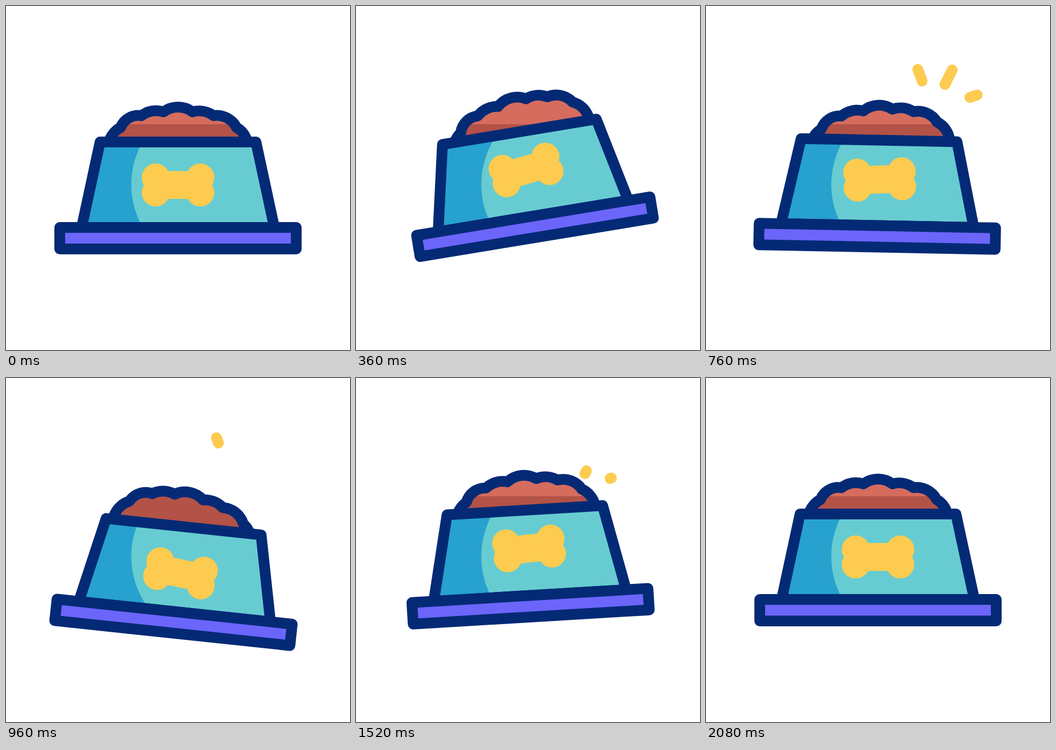
Animation, 640 px wide and 640 px high, one loop 2.4 s. Source, as an HTML page:

```html
<!DOCTYPE html>
<html lang="en">
<head>
<meta charset="utf-8">
<title>Pet bowl</title>
<style>
  @property --lift { syntax: "<length>"; inherits: true; initial-value: 0px; }
  @property --tilt { syntax: "<angle>"; inherits: true; initial-value: 0deg; }
  @property --stir { syntax: "<angle>"; inherits: true; initial-value: 0deg; }
  @property --spin { syntax: "<angle>"; inherits: true; initial-value: 0deg; }
  @property --boneX { syntax: "<length>"; inherits: true; initial-value: 0px; }
  @property --boneY { syntax: "<length>"; inherits: true; initial-value: 0px; }

  html, body { margin: 0; height: 100%; overflow: hidden; background: #fff; }

  svg {
    display: block; width: 100%; height: 100%;
    animation: 2.4s cubic-bezier(.37, 0, .63, 1) infinite;
    animation-name: lift, tilt, stir, spin, boneX, boneY;
  }

  .line { stroke: #042a75; stroke-width: 20; stroke-linejoin: round; stroke-linecap: round; }

  /* the bowl swings about (320, 352); food and bone lag behind it */
  .bowl {
    transform: translate(320px, calc(352px + var(--lift))) rotate(var(--tilt)) translate(-320px, -352px);
  }
  .food {
    transform: translate(320px, calc(352px + var(--lift))) rotate(var(--tilt))
      translate(0, -112px) rotate(var(--stir)) translate(-320px, -240px);
  }
  .bone {
    transform: translate(calc(320px + var(--boneX)), calc(333px + var(--boneY)))
      rotate(var(--spin)) translate(-320px, -333px);
  }

  @keyframes lift {
    0%, 5.1% { --lift: 0px; }
    21.7% { --lift: -31px; }
    41.7% { --lift: 24px; }
    68.3% { --lift: -10px; }
    86.7%, 100% { --lift: 0px; }
  }
  @keyframes tilt {
    0% { --tilt: 0deg; }
    19.4% { --tilt: -10.6deg; }
    39% { --tilt: 6.2deg; }
    55% { --tilt: -8.4deg; }
    70%, 100% { --tilt: 0deg; }
  }
  @keyframes stir {
    0% { --stir: 0deg; }
    17.5% { --stir: -6.3deg; }
    29.2% { --stir: -6deg; }
    40% { --stir: 5.2deg; }
    58.3% { --stir: -3.4deg; }
    81.7%, 100% { --stir: 0deg; }
  }
  @keyframes spin {
    0% { --spin: 0deg; }
    17.5%, 26.2% { --spin: -6.8deg; }
    40.8% { --spin: 6.2deg; }
    55.8% { --spin: -5.5deg; }
    70.8%, 100% { --spin: 0deg; }
  }
  @keyframes boneX {
    0% { --boneX: 0px; }
    51.7% { --boneX: 3.9px; }
    73.3% { --boneX: 3.5px; }
    86.7%, 100% { --boneX: 0px; }
  }
  @keyframes boneY {
    0% { --boneY: 0px; }
    25% { --boneY: -12px; }
    46.7% { --boneY: 12px; }
    70.8% { --boneY: -14px; }
    86.7%, 100% { --boneY: 0px; }
  }

  /* sparks shoot out, then their tails catch up */
  .spark {
    fill: none; stroke: #fdcb50; stroke-width: 20; stroke-linecap: round;
    stroke-dasharray: 0 300; opacity: 0;
    animation: dart 2.4s linear var(--delay, 0s) infinite;
  }
  .slow { animation-name: drift; }
  .again { --delay: .885s; }

  @keyframes dart {
    0%, 25.79% { opacity: 0; stroke-dasharray: 0 300; stroke-dashoffset: 0; }
    25.8% { opacity: 1; stroke-dasharray: 0 300; stroke-dashoffset: 0; }
    28.3% { stroke-dasharray: 43 300; stroke-dashoffset: 0; }
    31.7% { stroke-dasharray: 60 300; stroke-dashoffset: -40; }
    36.6% { opacity: 1; stroke-dasharray: 0 300; stroke-dashoffset: -100; }
    36.61%, 100% { opacity: 0; stroke-dasharray: 0 300; stroke-dashoffset: -100; }
  }
  @keyframes drift {
    0%, 26.69% { opacity: 0; stroke-dasharray: 0 300; stroke-dashoffset: 0; }
    26.7% { opacity: 1; stroke-dasharray: 0 300; stroke-dashoffset: 0; }
    28.8% { stroke-dasharray: 35 300; stroke-dashoffset: 0; }
    31.7% { stroke-dasharray: 62 300; stroke-dashoffset: -18; }
    33.1% { stroke-dasharray: 73 300; stroke-dashoffset: -27; }
    40% { stroke-dasharray: 29 300; stroke-dashoffset: -71; }
    44.5% { opacity: 1; stroke-dasharray: 0 300; stroke-dashoffset: -100; }
    44.51%, 100% { opacity: 0; stroke-dasharray: 0 300; stroke-dashoffset: -100; }
  }
</style>
</head>
<body>
<svg viewBox="0 0 640 640">
  <defs>
    <path id="mound" d="M190 260A45 45 0 0 1 213 226A36 36 0 0 1 252 204A45 45 0 0 1 293 197
      A45 45 0 0 1 347 197A45 45 0 0 1 386 204A42 42 0 0 1 429 226A42 42 0 0 1 450 260"/>
    <path id="body" d="M175 253H465L499.3 412H140.7Z"/>
    <clipPath id="foodClip"><use href="#mound" class="food"/></clipPath>
    <clipPath id="bodyClip"><use href="#body" class="bowl"/></clipPath>
  </defs>

  <!-- light and shade stay still while the shapes move through them -->
  <g clip-path="url(#foodClip)">
    <rect width="640" height="640" fill="#b35247"/>
    <rect width="640" height="220" fill="#d56c5e"/>
  </g>
  <use href="#mound" class="food line" fill="none"/>

  <g clip-path="url(#bodyClip)">
    <rect width="640" height="640" fill="#27a1ce"/>
    <circle cx="394" cy="332" r="161" fill="#67ccd1"/>
  </g>

  <g class="bowl">
    <use href="#body" class="line" fill="none"/>
    <rect class="line" x="100" y="412" width="440" height="40" fill="#6c65fa"/>
    <g class="bone" fill="#fdcb50">
      <rect x="278" y="307" width="84" height="52"/>
      <circle cx="278.5" cy="319" r="26"/>
      <circle cx="361.5" cy="319" r="26"/>
      <circle cx="278.5" cy="347" r="26"/>
      <circle cx="361.5" cy="347" r="26"/>
    </g>
  </g>

  <g>
    <path class="spark slow" pathLength="100" d="M404.5 146L391.5 111"/>
    <path class="spark" pathLength="100" d="M435.5 164L458 119"/>
    <path class="spark" pathLength="100" d="M482 173L504.5 165.5"/>
  </g>
  <g class="again" transform="translate(-9.5 14)">
    <path class="spark slow" pathLength="100" d="M404.5 146L391.5 111"/>
    <path class="spark" pathLength="100" d="M435.5 164L458 119"/>
    <path class="spark" pathLength="100" d="M482 173L504.5 165.5"/>
  </g>
</svg>
</body>
</html>
```
